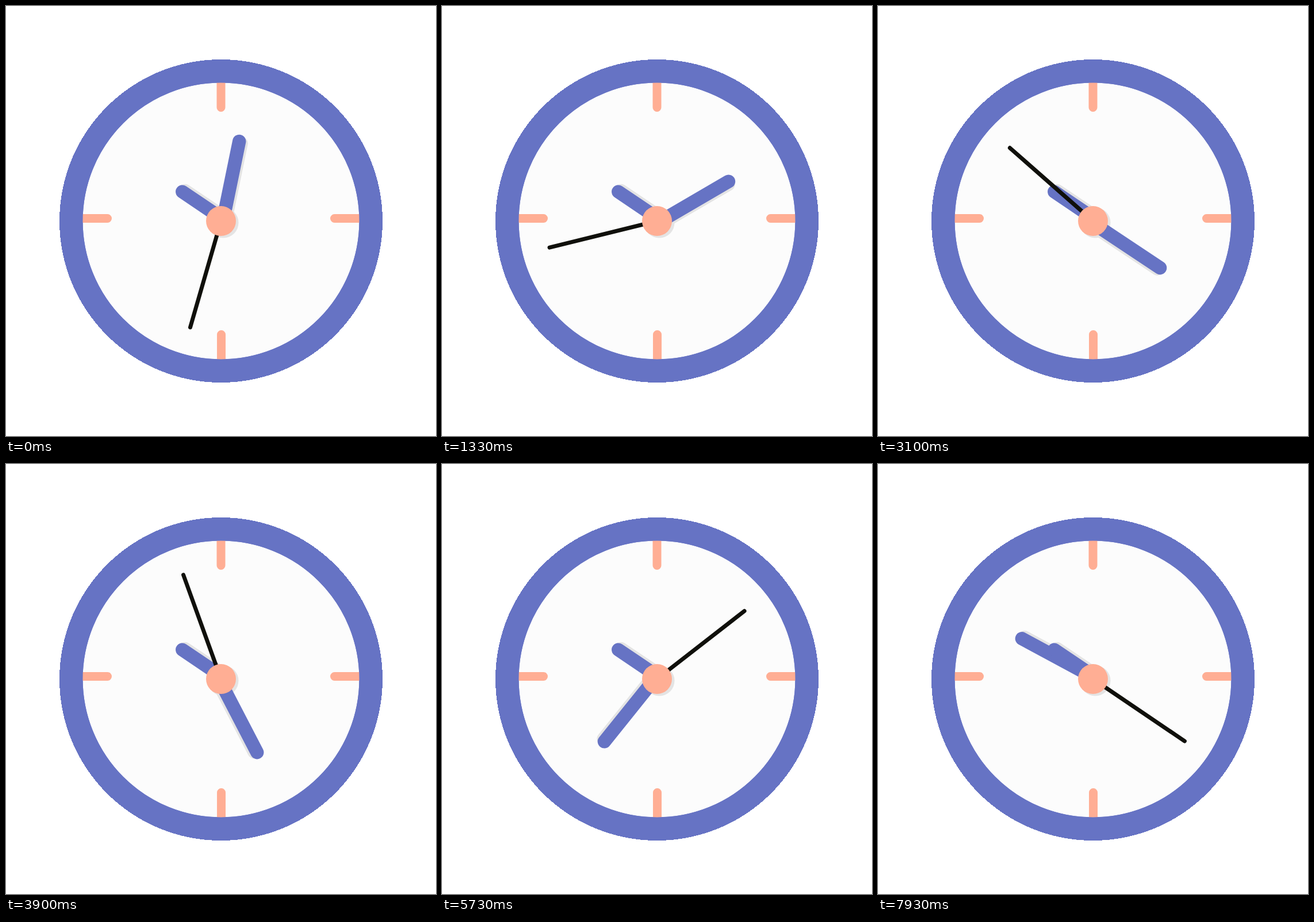
Animation, 748 px wide and 748 px high, one loop 8 s. Source, as an HTML page:

```html
<!DOCTYPE html>
<html lang="en">
<head>
<meta charset="utf-8">
<title>Clock</title>
<style>
  html, body { margin: 0; height: 100%; overflow: hidden; background: #fff; }
  svg { display: block; width: 100vw; height: 100vh; }
  .ticks { stroke: #ffae94; stroke-width: 15; stroke-linecap: round; }
  .hand { stroke: #6673c4; stroke-width: 23.4; stroke-linecap: round; }
  .shadow { stroke: #e4e4e4; }
  .second { stroke: #10100b; stroke-width: 7; stroke-linecap: round; }
</style>
</head>
<body>
<svg viewBox="-374 -374 748 748">
  <circle r="281" fill="#6673c4" shape-rendering="crispEdges"/>
  <circle r="240.5" fill="#fcfcfc"/>
  <path class="ticks" d="M0-250V-197.5M.5 250V197.5M-250-4.5H-197.5M250-4.5H197.5"/>
  <circle r="260" fill="none" stroke="#6673c4" stroke-width="39"/>

  <circle cx="4" cy="3" r="26.5" fill="#e4e4e4"/>
  <g class="minute"><path class="hand shadow" d="M7.2 3V-139.2"/></g>
  <g transform="rotate(304)"><path class="hand shadow" d="M8.6 3V-81.2"/></g>
  <g class="minute"><path class="hand" d="M3.2 0V-142.2"/></g>
  <g transform="rotate(304)"><path class="hand" d="M4.6 0V-84.2"/></g>
  <path class="second" d="M0 0V-192.6"/>
  <circle r="26" fill="#ffae94"/>
</svg>
<script>
  const LOOP = 8000;
  const MINUTE_START = 11.6, MINUTE_SPEED = 36.14;
  const SECOND_START = 196.13, SECOND_STEP = 36;
  const minuteParts = document.querySelectorAll('.minute');
  const secondHand = document.querySelector('.second');

  const rotate = (part, angle) => part.setAttribute('transform', `rotate(${angle})`);

  // The picture updates twice every 100 ms, at uneven intervals.
  function heldSeconds(ms) {
    const tenth = Math.floor(ms / 100);
    return tenth / 10 + (ms - tenth * 100 >= 30 ? 1 / 30 : 0);
  }

  function draw(now) {
    const time = heldSeconds(now % LOOP);
    const whole = Math.floor(time + 1e-6);
    // Each step takes half a second, then the hand rests.
    const steps = whole + Math.min(1, (time - whole) * 2);
    minuteParts.forEach(part => rotate(part, MINUTE_START + MINUTE_SPEED * time));
    rotate(secondHand, SECOND_START + SECOND_STEP * steps);
  }

  let start;
  function tick(now) {
    start ??= now;
    draw(now - start);
    requestAnimationFrame(tick);
  }
  draw(0);
  requestAnimationFrame(tick);
</script>
</body>
</html>
```
